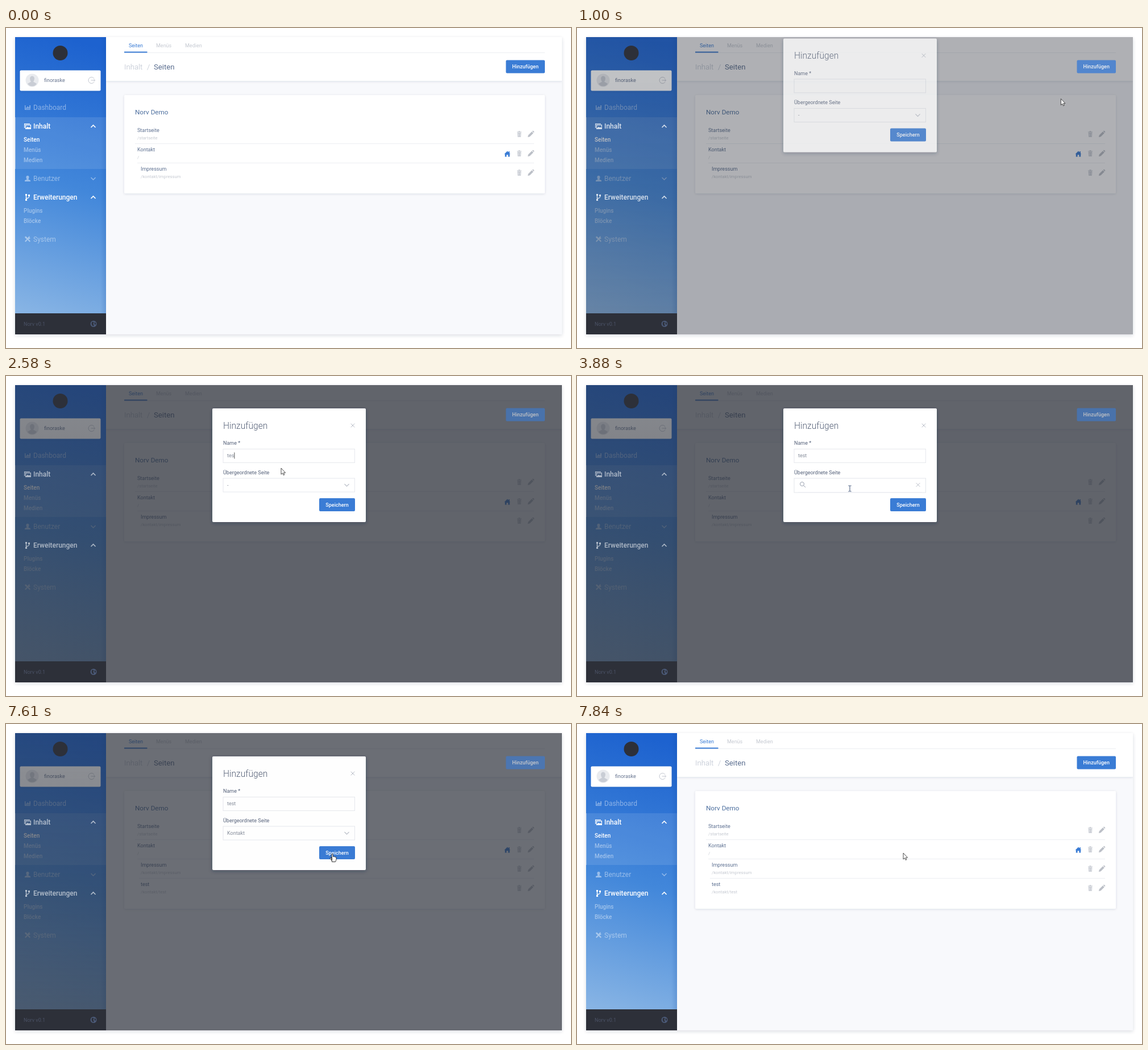
An HTML page that plays this animation: 994x563 px, repeating every 8000 ms.

```html
<!DOCTYPE html>
<html lang="de">
<head>
<meta charset="utf-8">
<title>Seiten</title>
<style>
html, body { margin: 0; height: 100%; overflow: hidden; background: #fff; }
svg { display: block; width: 100vw; height: 100vh; font-family: Roboto, sans-serif; }
text { white-space: pre; }
</style>
</head>
<body>
<svg id="stage" viewBox="0 0 994 563"></svg>
<script>
const LOOP = 8000;
const BLUE = '#3a7cd5', INK = '#5c6f90', MUTED = '#c6cad2';

// Text is placed by its left edge and the middle of its capitals.
const text = (x, y, str, size = 9, fill = INK, weight = 400, extra = '') =>
  `<text x="${x}" y="${y + size * .355}" font-size="${size}" fill="${fill}" font-weight="${weight}" ${extra}>${str}</text>`;
const rect = (x, y, w, h, fill, extra = '') =>
  `<rect x="${x}" y="${y}" width="${w}" height="${h}" fill="${fill}" ${extra}/>`;
const line = (x, y, d, color, width = 1) =>
  `<path transform="translate(${x} ${y})" d="${d}" fill="none" stroke="${color}" stroke-width="${width}"/>`;
const shape = (x, y, d, fill) =>
  `<path transform="translate(${x} ${y})" d="${d}" fill="${fill}" fill-rule="evenodd"/>`;
const rule = (x1, x2, y, color = '#eceef2') => line(x1, y, `M0 0H${x2 - x1}`, color);
const group = (id, content, extra = '') => `<g id="${id}" ${extra}>${content}</g>`;
const chevron = (x, y, up, color, width = 1.4) =>
  line(x, y, up ? 'M-4 2L0-2L4 2' : 'M-4-2L0 2L4-2', color, width);
const cross = (x, y) => line(x, y, 'M-3.3-3.3L3.3 3.3M3.3-3.3L-3.3 3.3', '#b9bec8');
const button = (x, y, w, label) =>
  rect(x, y, w, 23, BLUE, 'rx="2"') + text(x + w / 2, y + 11.5, label, 9, '#fff', 500, 'text-anchor="middle"');

const ICONS = {
  chart: 'M-5-4V4H5V2.7H-3.7V-4ZM-3 2V0H-1.4V2ZM-.8 2V-2H.8V2ZM1.4 2V-1H2.7V2ZM3.3 2V-4H5V2Z',
  images: 'M-6-5H4V-3.8H-4.8V3H-6ZM-4-3H6V5H-4ZM-2.8-1.8V3.5L0 .5L2 2.3L3.3 1L4.8 3V-1.8Z',
  user: 'M-2.6-2.4a2.6 2.9 0 1 1 5.2 0Q2.4.2 1.2 1.2L5 3V5H-5V3L-1.2 1.2Q-2.4.2-2.6-2.4Z',
  branch: 'M-4-6H-1V-3H-1.8V1Q2 .8 2.2-2H1V-5H4V-2H3.4Q3 2-1.8 2.4V3H-1V6H-4V3H-3.2V-3H-4Z',
  tools: 'M-5-4L-3-5L0-2L2.4-5H4L3-3L5-2L3.5-.5L1.4-.6L5 3.5L3.5 5L0 1.3L-3.4 5L-5 3.5L-1.4 0L-4-2Z',
  trash: 'M-4-4H-1.5V-5.2H1.5V-4H4V-3H-4ZM-3.3-2.2H3.3L2.8 5.2H-2.8ZM-1.7-1V4H-1V-1ZM1-1V4H1.7V-1Z',
  pencil: 'M-5.6 5.6L-4.7 2L1.6-4.3L4.3-1.6L-2 4.7ZM2.3-5L3.2-5.7Q4-6 4.7-5.3L5.4-4.6Q6-4 5.6-3.2L5-2.3Z',
  home: 'M-5 0L0-5L2.3-2.7V-4.4H3.9V-1.1L5 0L4.2.8V5H1.4V1.6H-1.4V5H-4.2V.8Z',
  globe: 'M-5.5 0a5.5 5.5 0 1 1 11 0a5.5 5.5 0 1 1-11 0ZM-3.5-2L-1-4L.6-2L-1 .4L1 2L-.6 4.3L-3 2ZM2-3.4L4.2-1L3.4 2L1.6 0Z'
};
const icon = (name, x, y, fill) => shape(x, y, ICONS[name], fill);

function menuItem(y, name, label, fill) {
  return icon(name, 38, y, fill) + text(48, y, label, 12, fill, fill === '#fff' ? 500 : 400);
}

function pageRow(x, y, title, path, isHome) {
  return text(x, y, title) + text(x, y + 13, path, 7.7, MUTED) +
    (isHome ? icon('home', 882, y + 7.5, BLUE) : '') +
    icon('trash', 903, y + 6.5, MUTED) + icon('pencil', 923.5, y + 6.5, '#bcc0c8');
}

const DIM = 'rgba(255,255,255,.45)';
const sidebar =
  rect(16, 16, 160, 486, 'url(#blue)') +
  rect(16, 157, 160, 91, '#fff', 'opacity=".1"') + rect(16, 157, 1, 91, '#fff', 'opacity=".3"') +
  rect(166, 16, 10, 486, 'url(#edge)') +
  rect(16, 502, 160, 37, '#2d3039') +
  rect(24.5, 74.5, 142, 36, '#fff', 'rx="2" filter="url(#soft)"') +
  '<circle cx="46" cy="92" r="11.5" fill="#e9ebef"/>' +
  shape(46, 93, 'M-4-4a4 4.6 0 1 1 8 0Q3.7 0 2 1.6L8 5Q5 9.5 0 9.5T-8 5L-2 1.6Q-3.7 0-4-4Z', '#c9cdd5') +
  text(67, 92, 'finoraske', 9, '#66748f') +
  line(150.5, 92, 'M4.6-3A5.5 5.5 0 1 0 4.6 3M-1 0H6M4-2L6 0L4 2', '#c3c7d0', 1) +
  menuItem(140, 'chart', 'Dashboard', DIM) +
  text(31, 196, 'Seiten', 10, '#fff', 500) +
  [['Menüs', 214], ['Medien', 232], ['Plugins', 321], ['Blöcke', 339]]
    .map(([label, y]) => text(31, y, label, 10, DIM, 500)).join('') +
  menuItem(265, 'user', 'Benutzer', DIM) + chevron(153.5, 265, false, DIM) +
  menuItem(371.5, 'tools', 'System', DIM) +
  text(31, 520.5, 'Norv v0.1', 9, '#4b5266') + icon('globe', 154, 520.5, '#4b5a78');

const content =
  rect(176, 16, 802, 523, '#f8f9fc') +
  rect(176, 16, 802, 77, '#fff', 'filter="url(#soft)"') +
  text(216, 30.5, 'Seiten', 9, BLUE) + text(264, 30.5, 'Menüs', 9, MUTED) + text(315, 30.5, 'Medien', 9, MUTED) +
  rule(208, 948, 43.5) + rect(208, 41.5, 40.5, 2, BLUE) +
  text(208, 68, 'Inhalt', 13.2, '#b9c0cd', 300) + text(248, 68, '/', 13.2, '#b9c0cd', 300) +
  text(260, 68, 'Seiten', 13.2, INK) +
  '<rect id="card" x="208" y="118" width="740" height="173" rx="2" fill="#fff" filter="url(#soft)"/>' +
  text(227, 148, 'Norv Demo', 11.7, '#4e709f') +
  pageRow(231, 180, 'Startseite', '/startseite') + rule(227, 929, 203.5) +
  pageRow(231, 214, 'Kontakt', '/', true) + rule(231, 929, 237.5) +
  pageRow(237, 248, 'Impressum', '/kontakt/impressum') +
  group('newRow', rule(234, 929, 271.5) + pageRow(237, 282, 'test', '/kontakt/test'));

// These parts stay brighter than the rest while the page is dimmed.
const bright =
  menuItem(173, 'images', 'Inhalt', '#fff') + chevron(153.5, 173, true, '#fff', 1.6) +
  menuItem(298, 'branch', 'Erweiterungen', '#fff') + chevron(153.5, 298, true, '#fff', 1.6) +
  button(879.5, 56.5, 68.5, 'Hinzufügen');

const field = (y, h = 24) => rect(382, y + .5, 231.5, h, '#fff', 'stroke="#e6e8ed"');
const dialog =
  rect(363, 57, 270, 200, '#fff', 'rx="2" filter="url(#lift)"') +
  text(382, 87, 'Hinzufügen', 15.6, '#566178', 300) + cross(610, 87) +
  text(382, 118, 'Name *', 9, '#55617a') + field(128) +
  text(389, 140, '', 9, '#858c9a', 400, 'id="nameText"') +
  text(382, 169.5, 'Übergeordnete Seite', 9, '#55617a') +
  button(551, 215, 63, 'Speichern') +
  group('closedSelect', field(179.5) + text(389, 191.5, '-', 9, '#858c9a', 400, 'id="choice"') +
    chevron(599.5, 192, false, '#b9bec8', 1.1)) +
  group('openSelect',
    '<rect id="panel" x="382" y="180" width="231.5" height="25" fill="#fff" stroke="#e3e6eb"/>' +
    line(396, 190, 'M3.5 0A3.5 3.5 0 1 1-3.5 0A3.5 3.5 0 1 1 3.5 0M2.5 2.5L6 6', '#9aa1af') +
    text(408, 191.5, '', 9, '#7b8496', 400, 'id="searchText"') + cross(600, 191.5) +
    rule(389, 607, 204.5) +
    group('option', '<rect id="hover" x="389" y="207" width="218" height="23" fill="#f3f5f9"/>' +
      text(394, 219, 'Kontakt', 9, '#66789a'))) +
  '<rect id="caret" width="1" height="11" fill="#555"/>';

const pointers =
  group('arrow', '<path d="M0 0V11L2.5 8.7L4.2 12.4L5.9 11.6L4.3 8.1H7.6Z" fill="#fff" stroke="#222" stroke-width=".8"/>') +
  group('hand', '<path d="M-1 1Q0-.6 1.2 1V5.5Q2.4 4.3 3.4 5.8Q4.6 4.8 5.3 6.2Q7 5.6 7 7.5V10.5Q6.8 12 5.5 14.5H-.6Q-1-.2 -1 12L-3.6 8.8Q-4.3 7-2.8 7L-1 8.6Z" fill="#fff" stroke="#222" stroke-width=".9"/>') +
  group('beam', '<path d="M-2.5-5H-.6L0-4.4L.6-5H2.5M-2.5 5H-.6L0 4.4L.6 5H2.5M0-4.4V4.4" fill="none" stroke="#3a4f75" stroke-width="1"/>');

const shadow = (id, dy, blur, opacity) =>
  `<filter id="${id}" x="-20%" y="-20%" width="140%" height="150%"><feDropShadow dx="0" dy="${dy}" stdDeviation="${blur}" flood-color="#1a2a4a" flood-opacity="${opacity}"/></filter>`;

document.getElementById('stage').innerHTML = `<defs>
  <linearGradient id="blue" gradientUnits="userSpaceOnUse" x1="150" y1="30" x2="10" y2="510">
    <stop stop-color="#1d62cf"/><stop offset=".5" stop-color="#4287da"/><stop offset="1" stop-color="#8cb7e5"/></linearGradient>
  <linearGradient id="edge"><stop stop-color="#134a9c" stop-opacity="0"/><stop offset="1" stop-color="#134a9c" stop-opacity=".18"/></linearGradient>
  <linearGradient id="shade" x2="0" y2="1"><stop stop-color="#2b2f38" stop-opacity=".56"/><stop offset="1" stop-color="#2b2f38" stop-opacity=".72"/></linearGradient>
  ${shadow('soft', 1, 2, .12)}${shadow('lift', 2, 3, .35)}
  <clipPath id="frame">${rect(16, 16, 962, 523, '#fff')}</clipPath></defs>
  ${rect(16, 16, 962, 523, '#fff', 'filter="url(#lift)" opacity=".45"')}
  <g clip-path="url(#frame)">${content}${sidebar}
  ${group('overlay', rect(176, 16, 802, 523, '#2b2f38', 'opacity=".74"') + rect(16, 16, 160, 486, 'url(#shade)'))}
  <circle cx="95.5" cy="44" r="13" fill="#2d3039"/>${group('bright', bright)}</g>
  ${group('dialog', dialog)}${group('cursor', pointers)}`;

const el = {};
document.querySelectorAll('[id]').forEach(node => el[node.id] = node);
const show = (name, on) => el[name].style.display = on ? '' : 'none';

// Linear value of column `col` between keys of the form [time, value, ...].
function track(keys, t, col = 1) {
  const i = keys.findIndex(key => key[0] > t);
  if (i === 0) return keys[0][col];
  if (i < 0) return keys[keys.length - 1][col];
  const a = keys[i - 1], b = keys[i];
  return a[col] + (b[col] - a[col]) * (t - a[0]) / (b[0] - a[0]);
}
const latest = (steps, t) => steps.reduce((value, [from, next]) => t >= from ? next : value, '');
const within = (t, ...spans) => spans.some(([from, to]) => t >= from && t < to);

const dimming = [[850, 0], [910, .12], [1000, .5], [1080, .94], [1160, 1], [7540, 1], [7610, .94], [7690, .6], [7765, .2], [7840, 0]];
const fading = [[850, 0], [910, .3], [1000, .76], [1080, 1], [7610, 1], [7690, .6], [7765, .2], [7840, 0]];
const sliding = [[850, -74], [910, -66], [1000, -39], [1080, -3], [1160, 0]];
const path = [
  [70, 952, 390], [300, 948, 260], [520, 930, 125], [700, 914, 72], [830, 911, 69], [910, 905, 78],
  [1000, 853, 124], [1080, 723, 170], [1160, 610, 168], [1300, 510, 147], [1500, 481, 140], [2500, 481, 140],
  [2580, 484, 162], [2870, 487, 195], [3030, 484, 200], [3260, 475, 212], [3410, 475, 212],
  [3560, 480, 198], [6230, 480, 198], [6300, 470, 210], [6370, 450, 219], [6540, 450, 219],
  [6800, 500, 222], [7040, 558, 226], [7240, 574, 228], [7610, 574, 228], [7840, 574, 227]
];
const pointerKinds = [[70, 'arrow'], [620, 'hand'], [910, 'arrow'], [1400, 'beam'], [2560, 'arrow'],
  [3480, 'beam'], [6290, 'arrow'], [6370, 'hand'], [6540, 'arrow'], [7040, 'hand'], [7690, 'arrow']];
const nameSteps = [[2080, 't'], [2170, 'te'], [2400, 'tes'], [2640, 'test']];
const searchSteps = [[5070, 'k'], [5220, 'ko'], [5450, 'kon']];

function placeCaret(t) {
  const inName = within(t, [1300, 1780], [2080, 3030]);
  const inSearch = within(t, [3260, 3730], [4280, 4750], [5070, 6000]);
  show('caret', inName || inSearch);
  const label = inName ? el.nameText : el.searchText;
  const width = label.textContent ? label.getComputedTextLength() : 0;
  el.caret.setAttribute('x', (inName ? 389 : 408) + width);
  el.caret.setAttribute('y', inName ? 134.5 : 186);
}

function render(t) {
  const dim = track(dimming, t);
  el.overlay.style.opacity = dim;
  el.bright.style.opacity = 1 - .4 * dim;
  el.dialog.style.opacity = track(fading, t);
  el.dialog.setAttribute('transform', `translate(0 ${track(sliding, t)})`);

  const saved = t >= 7610;
  show('newRow', saved);
  el.card.setAttribute('height', saved ? 207 : 173);

  const open = within(t, [3030, 6540]), found = t >= 5070;
  show('openSelect', open);
  show('closedSelect', !open);
  show('option', found);
  show('hover', t >= 6300);
  el.panel.setAttribute('height', found ? 54 : 25);
  el.choice.textContent = t >= 6540 ? 'Kontakt' : '-';
  el.nameText.textContent = latest(nameSteps, t);
  el.searchText.textContent = latest(searchSteps, t);
  placeCaret(t);

  const kind = latest(pointerKinds, t);
  for (const name of ['arrow', 'hand', 'beam']) show(name, name === kind);
  el.cursor.setAttribute('transform', `translate(${track(path, t)} ${track(path, t, 2)})`);
}

const start = performance.now();
function tick() {
  render((performance.now() - start) % LOOP);
  requestAnimationFrame(tick);
}
tick();
</script>
</body>
</html>
```
